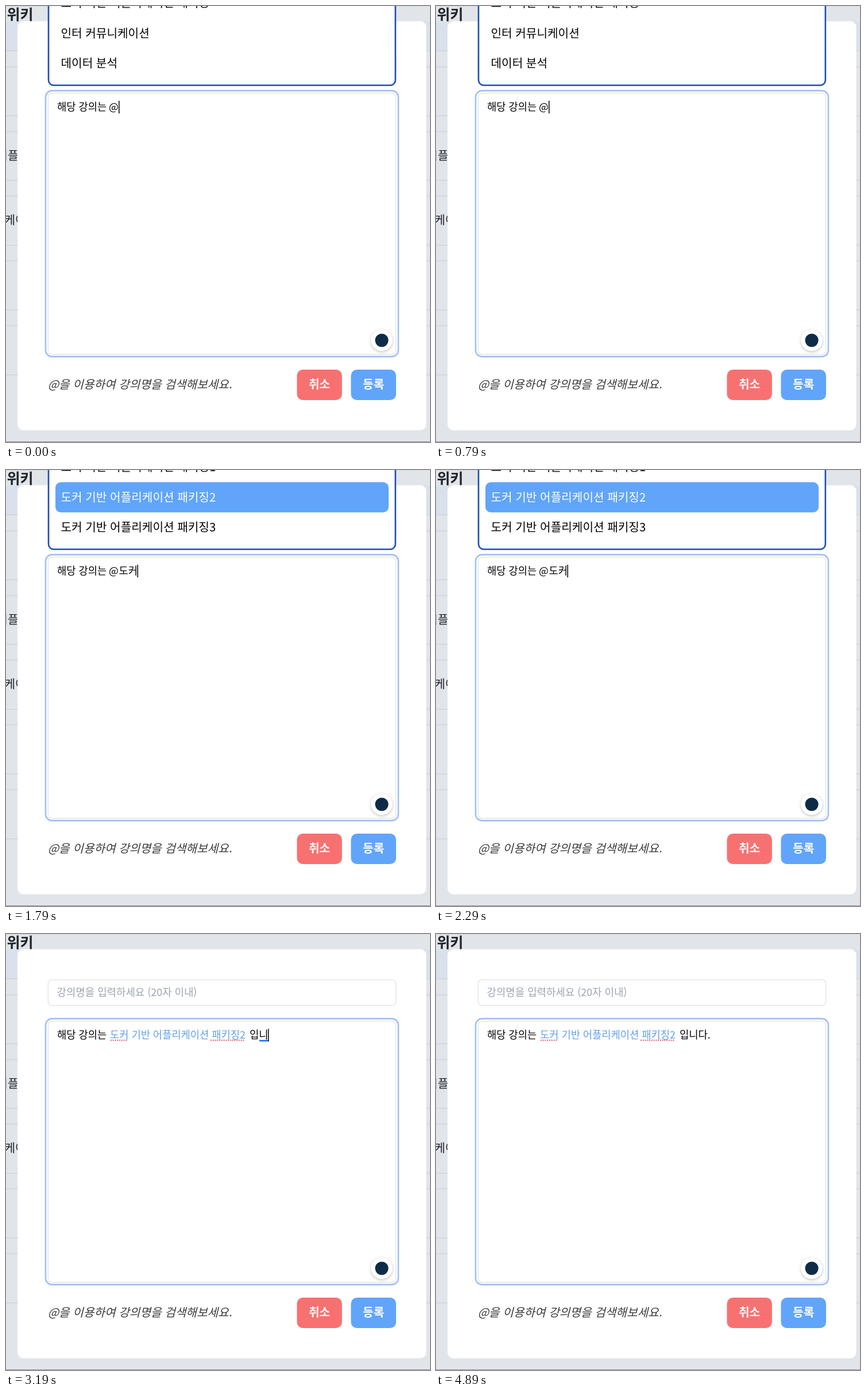
Write an HTML page that moves like this. It is 738 px wide and 759 px high and loops after 4990 ms.

```html
<!DOCTYPE html>
<html lang="ko">
<head>
<meta charset="utf-8">
<style>
html, body { margin: 0; width: 100%; height: 100%; overflow: hidden; background: #e1e5ea; }
svg { display: block; }
text { font: 20.2px "Noto Sans CJK KR", "Noto Sans CJK", sans-serif; white-space: pre; }
.field text { font-size: 17.67px; }
.button { font-weight: 600; fill: #fff; text-anchor: middle; }
</style>
</head>
<body>
<svg width="738" height="759" viewBox="0 0 738 759">
  <defs>
    <filter id="soft" x="-50%" y="-50%" width="200%" height="200%">
      <feDropShadow dx="0" dy="1.5" stdDeviation="2.5" flood-opacity=".28"/>
    </filter>
  </defs>

  <!-- page behind the dialog -->
  <rect y="27" width="738" height="51" fill="#dae1ec"/>
  <path id="rules" stroke="#cfd4da" stroke-width="1.3"/>
  <path d="M0 .5H738" stroke="#d5dade"/>
  <path d="M0 758.5H738" stroke="#8c9095"/>
  <g fill="#212529">
    <text x="1.5" y="23.5" style="font-size:25px;font-weight:700">위키</text>
    <text x="21.5" y="268" text-anchor="end">어플</text>
    <text x="-2.5" y="380">케이</text>
  </g>

  <!-- dialog -->
  <rect x="20" y="26.5" width="711.5" height="712" rx="10" fill="#fff"/>
  <g class="field">
    <rect x="73.2" y="79.7" width="605.5" height="45" rx="7" fill="#fff" stroke="#dfe2e6" stroke-width="1.3"/>
    <text id="hint" x="88.5" y="108" fill="#9ca3af" style="font-size:17.85px">강의명을 입력하세요 (20자 이내)</text>
    <rect x="68.9" y="147.4" width="614" height="463" rx="11.5" fill="#fff" stroke="#a4c0f3" stroke-width="2.6"/>
    <rect x="73.3" y="151.7" width="605.2" height="454.8" rx="7.5" fill="#fff" stroke="#dfe3e8" stroke-width="1.3"/>
    <text x="89" y="182">해당 강의는</text>
    <text id="at" x="179" y="182">@</text>
    <text id="tag" x="181" y="182" fill="#60a0ea">도커 기반 어플리케이션 패키징2</text>
    <path id="spell" d="M183 185H213M357 185H414" stroke="#e2646c" stroke-width="2.3" stroke-linecap="round" stroke-dasharray="0 3.75"/>
    <text id="word" y="182"></text>
    <rect id="compose" y="184.5" height="2.6" fill="#1672e6"/>
    <rect id="caret" y="165" width="1.5" height="22"/>
  </g>
  <circle cx="654" cy="582" r="18.5" fill="#fff" filter="url(#soft)"/>
  <circle cx="654" cy="582" r="11.5" fill="#0f2b46"/>

  <text x="73" y="666" fill="#3a3a3a" font-style="italic" style="font-style:italic">@을 이용하여 강의명을 검색해보세요.</text>
  <rect x="506.4" y="633" width="78.4" height="53" rx="10.5" fill="#f87171"/>
  <text class="button" x="545.6" y="666">취소</text>
  <rect x="600.4" y="633" width="78.6" height="53" rx="10.5" fill="#60a5fa"/>
  <text class="button" x="639.7" y="666">등록</text>

  <!-- search results -->
  <g id="none">
    <rect x="74" y="83" width="603.8" height="55" rx="9" fill="#fff" stroke="#d64a4a" stroke-width="2.6"/>
    <text x="85.5" y="117">검색 결과가 없습니다.</text>
  </g>
  <g id="list">
    <rect x="74" y="-40" width="603.8" height="178" rx="9" fill="#fff" stroke="#1d4eb0" stroke-width="2.6"/>
    <rect id="pick" x="86" y="21.3" width="580" height="52.4" rx="9.5" fill="#60a5fa"/>
    <text class="row" x="95.5" y="2"></text>
    <text class="row" x="95.5" y="54.5"></text>
    <text class="row" x="95.5" y="107"></text>
  </g>
</svg>
<script>
const $ = id => document.getElementById(id);
const show = (id, on) => $(id).style.display = on ? '' : 'none';
const course = '도커 기반 어플리케이션 패키징';
const lists = {
  all: [course, '인터 커뮤니케이션', '데이터 분석'],
  match: [1, 2, 3].map(n => course + n),
};

// start time, view, typed text, still composing
const steps = [
  [0, 'all', ''],
  [100, 'none', 'ㅈ', true],
  [690, 'all', ''],
  [890, 'none', 'ㄷ', true],
  [1090, 'match', '도', true],
  [1190, 'none', '돜', true],
  [1290, 'match', '도커', true],
  [1790, 'pick', '도커'],
  [2390, 'tagged', ''],
  [2690, 'done', ''],
  [2790, 'done', 'ㅇ', true],
  [2890, 'done', '이', true],
  [2990, 'done', '입', true],
  [3190, 'done', '입니', true],
  [3290, 'done', '입닏', true],
  [3390, 'done', '입니다', true],
  [3490, 'done', '입니다.'],
];
// caret fading as it blinks
const blink = [[0, 1], [3890, .6], [3990, .25], [4090, 0], [4290, .35], [4390, .75], [4490, 1], [4790, .3], [4890, 0]];
const at = (track, t) => track.filter(s => s[0] <= t).pop();

$('rules').setAttribute('d', [78, 106, 191, 218.5, 303.5, 331, 416.5, 443.5, 529, 556.5, 642]
  .map(y => `M0 ${y}H738`).join(''));

function draw(t) {
  const [, view, typed, composing] = at(steps, t);
  const tagged = view === 'tagged' || view === 'done';
  const picking = view === 'pick';
  const items = lists[picking ? 'match' : view];

  show('at', !tagged);
  show('tag', tagged);
  show('spell', view === 'done');
  show('hint', tagged);
  show('none', view === 'none');
  show('list', items);
  show('pick', picking);
  if (items) document.querySelectorAll('.row').forEach((row, i) => {
    row.textContent = items[i];
    row.setAttribute('fill', picking && i === 1 ? '#fff' : '#000');
  });

  const word = $('word');
  const x = tagged ? 424 : 196.5;
  word.textContent = typed;
  word.setAttribute('x', x);
  const end = typed ? x + word.getComputedTextLength() : view === 'tagged' ? 419.7 : x;
  $('caret').setAttribute('x', end - .5);
  $('caret').setAttribute('opacity', at(blink, t)[1]);
  show('compose', composing);
  $('compose').setAttribute('x', end - 15.5);
  $('compose').setAttribute('width', 15);
}

function tick() {
  draw(performance.now() % 4990);
  requestAnimationFrame(tick);
}
tick();
</script>
</body>
</html>
```
